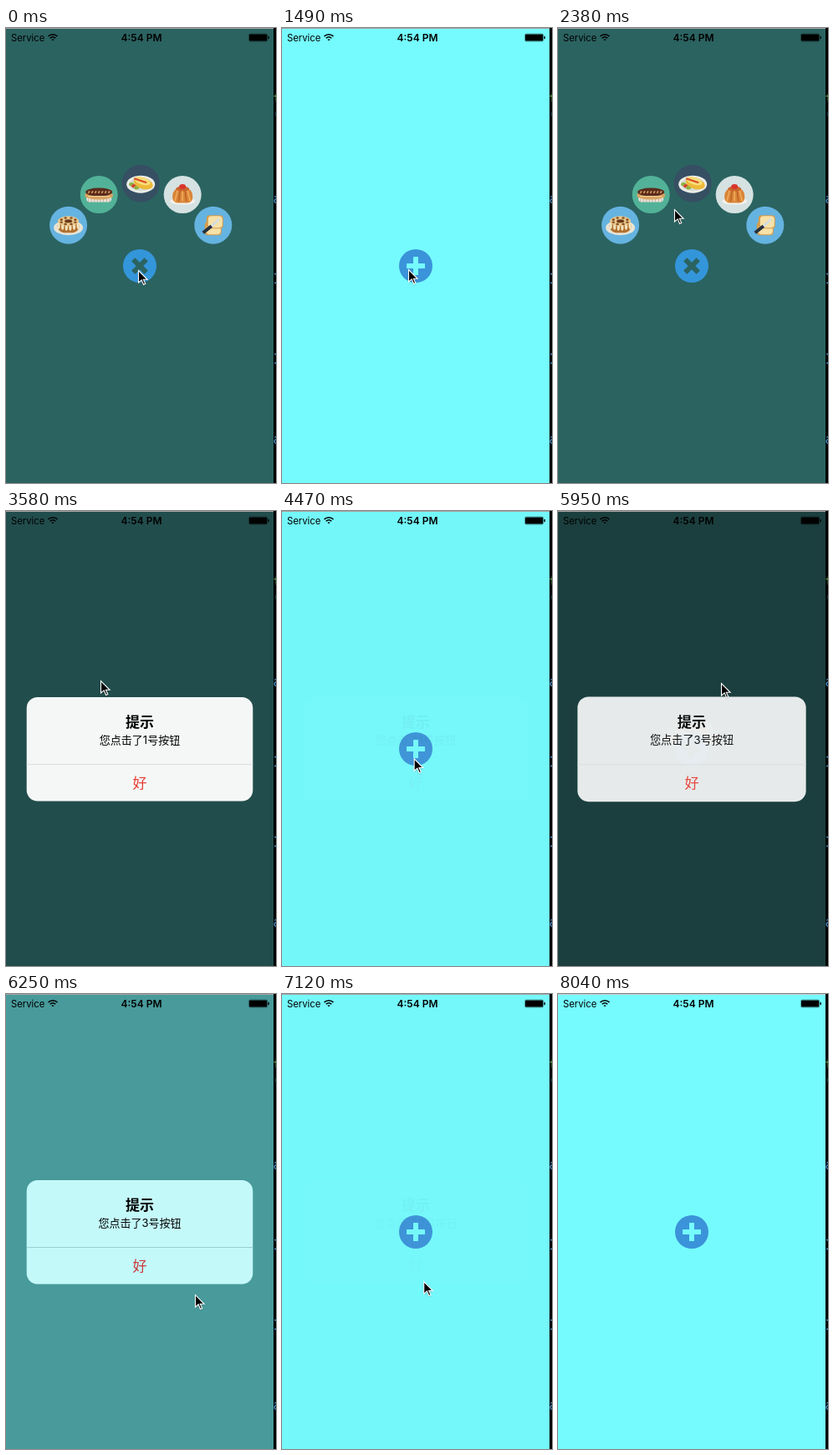
Recreate the animation shown at these times as an HTML page with a canvas. Size 323 by 545 pixels, loop 8140 ms.

```html
<!DOCTYPE html>
<html lang="zh">
<head>
<meta charset="utf-8">
<style>
html, body { margin: 0; width: 100%; height: 100%; overflow: hidden; background: #000; }
canvas { display: block; width: 323px; height: 545px; }
</style>
</head>
<body>
<canvas id="stage" width="323" height="545"></canvas>
<script>
const ctx = document.getElementById('stage').getContext('2d');
const LOOP = 8140, STEP = 148.9, TAU = Math.PI * 2;
const UI = 'Inter, "Noto Sans CJK SC", "Noto Sans CJK", sans-serif';
const WIDTH = 320, HEIGHT = 545, MIDDLE = 160, RADIUS = 100;
const CYAN = [117, 251, 253], SHADE = [43, 99, 97];
const ALERT_HOLD = 1020, ALERT_FADE = 225;

const clamp = v => Math.max(0, Math.min(1, v));
const smooth = v => v * v * (3 - 2 * v);
const easeOut = v => 1 - (1 - v) ** 3;
const backOut = v => 1 + 2.2 * (v - 1) ** 3 + 1.2 * (v - 1) ** 2;
const span = (t, start, length) => clamp((t - start) / length);
const mix = (a, b, k) => a.map((v, i) => v + (b[i] - v) * k);
const rgb = c => `rgb(${c.map(Math.round).join(',')})`;
const repeat = (n, draw) => { for (let i = 0; i < n; i++) draw(i - (n - 1) / 2); };

// Each menu closes either on its cross or by picking an item, which opens an alert.
const menus = [
  { open: -2000, close: 250 },
  { open: 1560, close: 3230, picked: 1 },
  { open: 4540, close: 5760, picked: 3 }
];

const spot = { plus: [158, 290], rest: [151, 289], first: [113, 203], third: [195, 206], ok: [156, 326] };
const moves = [
  { from: 600, to: 1340, end: spot.rest },
  { from: 1780, to: 2380, end: [139, 217] },
  { from: 2380, to: 2680, end: spot.first },
  { from: 3590, to: 4020, end: spot.ok },
  { from: 4320, to: 4520, end: spot.plus },
  { from: 4770, to: 5500, end: spot.third },
  { from: 5960, to: 6250, end: [226, 360] },
  { from: 6250, to: 6550, end: spot.ok },
  { from: 6850, to: 7700, end: [WIDTH, HEIGHT + 5] }
];

function oval(x, y, rx, ry, color, angle = 0) {
  ctx.fillStyle = color;
  ctx.beginPath();
  ctx.ellipse(x, y, rx, ry, angle, 0, TAU);
  ctx.fill();
}
function box(x, y, w, h, r, color) {
  ctx.fillStyle = color;
  ctx.beginPath();
  ctx.roundRect(x, y, w, h, r);
  ctx.fill();
}
function line(x1, y1, x2, y2, width, color) {
  ctx.strokeStyle = color;
  ctx.lineWidth = width;
  ctx.beginPath();
  ctx.moveTo(x1, y1);
  ctx.lineTo(x2, y2);
  ctx.stroke();
}
function label(text, x, y, font, color, align = 'center') {
  ctx.font = `${font} ${UI}`;
  ctx.fillStyle = color;
  ctx.textAlign = align;
  ctx.fillText(text, x, y);
}

function cake() {
  oval(0, 3, 17.5, 9, '#e9e4d4');
  box(-13, -7, 26, 16, 8, '#b0702f');
  repeat(6, i => oval(i * 4.6, 3 - Math.abs(i), 1.6, 4, '#f3e3bc'));
  oval(0, -5, 12.5, 6, '#e8c88f');
  repeat(8, i => oval(Math.cos(i * TAU / 8) * 9, Math.sin(i * TAU / 8) * 4 - 5, 1.7, 1.3, '#8a5223'));
  oval(0, -5, 4.5, 2, '#6b3b18');
}
function eclair() {
  box(-15, 1, 30, 8, 4, '#ece4d8');
  repeat(8, i => line(i * 3.6, 5, i * 3.6, 9, 1, '#b8aea4'));
  oval(0, 1, 17, 5, '#d9a25f');
  oval(0, -3, 16, 5, '#5a2c1c');
  repeat(7, i => oval(i * 4, -3, 1.1, 1.8, '#c58a55', .5));
  line(-13, 2, 13, 2, 1.2, '#f0cf98');
}
function omelette() {
  oval(0, 1, 17, 10.5, '#eceee9');
  oval(0, 1, 14, 8, '#d5dbd5');
  repeat(3, i => oval(i * 3 - 8, 3 + i * 2, 3, 2.2, i ? '#8cb544' : '#d74432'));
  oval(3, 0, 12, 6.5, '#edb938', .3);
  oval(2, -3, 10, 4.5, '#f8dc77', .3);
  line(-8, -6, 7, -1, 2, '#d7482a');
}
function pudding() {
  oval(0, 8, 15, 4, '#f4f2ec');
  box(-12, -8, 24, 18, [9, 9, 6, 6], '#da8438');
  repeat(5, i => line(i * 3, -5, i * 4.6, 8, 1.6, i % 2 ? '#bd6526' : '#f0ad58'));
  oval(0, -7, 8, 3, '#c9652c');
  oval(0, -9.5, 4, 3, '#d9342e');
}
function bread() {
  repeat(2, i => {
    const x = i * 2, y = i * -8;
    box(x - 9, y - 8, 20, 16, 4, '#d69b4b');
    box(x - 7, y - 7, 17, 14, 4, '#f6e1a7');
  });
  line(-4, 3, 7, -7, 3, '#d7dde0');
  line(-12, 9, -2, 1, 4, '#26303c');
}
const items = [
  ['#65b3e0', cake], ['#52b298', eclair], ['#364f62', omelette],
  ['#d5e2e1', pudding], ['#65b3e0', bread]
];

function menuState(t) {
  const { open, close } = menus.filter(m => t >= m.open).pop();
  const fade = smooth(span(t, close + 290, 200));
  const stay = 1 - smooth(span(t, close, 300));
  const entry = easeOut(span(t, open, 400));
  return {
    shade: entry * (1 - fade),
    turn: entry * stay,
    reach: i => backOut(span(t, open + i * 25, 420)) * stay
  };
}
function alertState(t) {
  const menu = menus.find(m => m.picked && t >= m.close && t < m.close + ALERT_HOLD + ALERT_FADE);
  if (!menu) return null;
  const entry = easeOut(span(t, menu.close, 330));
  return {
    number: menu.picked,
    alpha: entry * (1 - span(t, menu.close + ALERT_HOLD, ALERT_FADE)),
    scale: 1.15 - .15 * entry
  };
}

function drawMenu(state, background) {
  items.forEach(([color, drawFood], i) => {
    const reach = state.reach(i);
    if (reach < .01) return;
    const angle = (i - 5) * Math.PI / 6;
    const size = clamp(reach + .2);
    ctx.save();
    ctx.translate(161.2 + Math.cos(angle) * RADIUS * reach, 286.2 + Math.sin(angle) * RADIUS * reach);
    ctx.globalAlpha = clamp(reach * 2);
    ctx.scale(size, size);
    oval(0, 0, 22.5, 22.5, color);
    drawFood();
    ctx.restore();
  });
  ctx.save();
  ctx.translate(MIDDLE, 285);
  oval(0, 0, 20, 20, rgb(mix([59, 147, 217], [52, 150, 218], state.turn)));
  ctx.rotate(state.turn * Math.PI / 4);
  box(-11, -3, 22, 6, .5, background);
  box(-3, -11, 6, 22, .5, background);
  ctx.restore();
}

function drawAlert(state, shade) {
  const pale = clamp(shade * 1.25);
  const left = -135.3, width = 270.6;
  ctx.save();
  ctx.globalAlpha = state.alpha;
  ctx.translate(MIDDLE, 285);
  ctx.scale(state.scale, state.scale);
  box(left, -62, width, 124.5, 13, rgb(mix([196, 249, 250], [245, 247, 247], pale)));
  box(left, 18, width, 1, 0, rgb(mix([153, 207, 210], [219, 222, 224], pale)));
  label('提示', 0, -26, '700 17px', '#000');
  label(`您点击了${state.number}号按钮`, 0, -6, '400 13px', '#000');
  label('好', 0, 46.5, '400 17px', rgb(mix([205, 57, 58], [231, 60, 50], pale)));
  ctx.restore();
}

function drawStatusBar() {
  label('Service', 6, 15.5, '400 11.3px', '#000', 'left');
  label('4:54 PM', 162, 15.5, '600 12px', '#000');
  ctx.strokeStyle = '#000';
  ctx.lineWidth = 1.6;
  repeat(3, i => {
    ctx.beginPath();
    ctx.arc(56, 15.5, 4.6 + i * 3.2, -TAU * 3 / 8, -TAU / 8);
    ctx.stroke();
  });
  ctx.strokeStyle = 'rgba(0,0,0,.4)';
  ctx.lineWidth = .8;
  ctx.beginPath();
  ctx.roundRect(290.4, 6.9, 22.4, 9.2, 2);
  ctx.stroke();
  box(291, 7.5, 21.2, 8, 1, '#000');
  box(313.4, 9.7, 1.4, 3.6, .7, '#000');
}

function drawEdges(last) {
  box(0, 0, WIDTH, 1, 0, last ? '#c8cccb' : '#a6a4a4');
  box(WIDTH, 0, 3, HEIGHT, 0, '#000');
  ctx.textAlign = 'left';
  ctx.font = '15px "DejaVu Sans Mono", monospace';
  const glyph = (text, y, color) => {
    ctx.fillStyle = color;
    ctx.fillText(text, 319.5, y);
  };
  glyph('t', 90, '#63b34d');
  glyph('(', 108, '#2b9fc4');
  [...'aIIa'].forEach((c, i) => glyph(c, 210 + i * 96, '#4a98d2'));
}

function drawPointer(t) {
  if (t >= moves.at(-1).to) return;
  const [x, y] = moves.reduce((at, m) => mix(at, m.end, smooth(span(t, m.from, m.to - m.from))), spot.plus);
  ctx.save();
  ctx.translate(x + .5, y + .5);
  ctx.beginPath();
  [[0, 0], [0, 14.5], [3.7, 11.3], [6.1, 17], [8.3, 16], [5.9, 10.8], [10.6, 10.8]].forEach(p => ctx.lineTo(...p));
  ctx.closePath();
  ctx.shadowColor = 'rgba(0,0,0,.35)';
  ctx.shadowBlur = 2;
  ctx.shadowOffsetY = 1;
  ctx.fillStyle = '#000';
  ctx.fill();
  ctx.shadowColor = 'transparent';
  ctx.strokeStyle = '#fff';
  ctx.lineWidth = 1.1;
  ctx.stroke();
  ctx.restore();
}

function render(time) {
  const step = Math.floor((time % LOOP + 6) / STEP);
  const t = step * STEP;
  const menu = menuState(t), alert = alertState(t);
  const background = rgb(mix(CYAN, SHADE, menu.shade));
  box(0, 0, WIDTH, HEIGHT, 0, background);
  drawMenu(menu, background);
  if (alert) {
    box(0, 0, WIDTH, HEIGHT, 0, `rgba(0,0,0,${.39 * alert.alpha})`);
    drawAlert(alert, menu.shade);
  }
  drawStatusBar();
  drawEdges(step >= 54);
  drawPointer(t);
}

const begin = performance.now();
function tick() {
  render(performance.now() - begin);
  requestAnimationFrame(tick);
}
tick();
</script>
</body>
</html>
```
